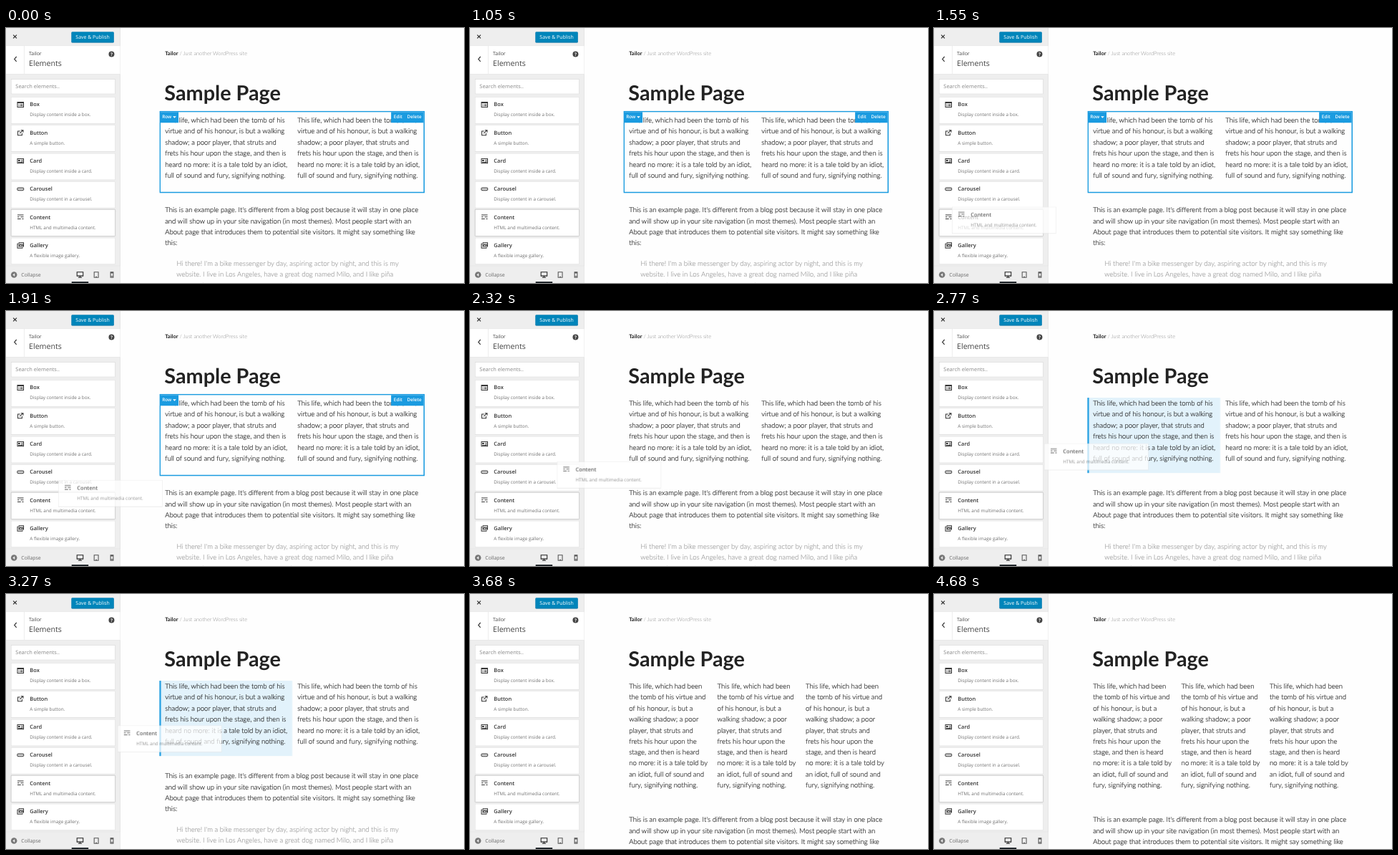
Write an HTML page that moves like this. It is 640 by 356 pixels and loops after 5.28 s.

```html
<!DOCTYPE html>
<html lang="en">
<head>
<meta charset="utf-8">
<title>Page builder</title>
<style>
  html, body { margin: 0; width: 100%; height: 100%; overflow: hidden; background: #fefefe; }
  /* Laid out at 1200px wide, shown at 640px; unrounded glyph advances keep text true to scale */
  #app {
    position: absolute; left: 0; top: 0; width: 1200px; height: 668px; overflow: hidden;
    transform: scale(.533333); transform-origin: 0 0; background: #fefefe;
    font: 13px/1 "Open Sans", sans-serif; color: #444; --loop: 5280ms;
    text-rendering: geometricPrecision;
  }
  #app div, #app svg { position: absolute; white-space: nowrap; box-sizing: border-box; }
  svg { overflow: visible; }

  /* Preview */
  .copy { left: 416.6px; font: 300 18px/28.8px Lato, sans-serif; color: #222; -webkit-text-stroke: .3px; }
  .brand { left: 416.6px; top: 59px; font: 300 14px/1.2 Lato, sans-serif; color: #8c8c8c; }
  .brand b { font-weight: 700; color: #222; }
  .title { left: 415px; top: 137px; font: 700 54px/1.2 Lato, sans-serif; color: #222; }
  .quote { left: 30px; top: 140.5px; color: #a0a0a0; }
  .row { left: 402px; top: 217px; width: 695px; height: 215px; border: 3px solid #1a9be0; }
  .tab { top: 0; height: 28px; background: #1a9be0; color: #fff; font-weight: 600; font-size: 12px; line-height: 26px; }
  .drop { left: 402px; top: 227px; width: 348px; height: 197px; border-left: 4px solid #1a9be0; background: rgba(26, 155, 224, .12); }

  /* Sidebar */
  .side { left: 0; top: 0; width: 300px; height: 668px; background: #eee; border-right: 1px solid #ddd; }
  .head { left: 0; top: 46px; width: 299px; height: 75px; background: #fff; border: solid #ddd; border-width: 1px 0; }
  .back { left: 0; top: 0; width: 48px; height: 73px; border-right: 1px solid #ddd; }
  .save { left: 171px; top: 10px; width: 112px; height: 29px; border-radius: 3px; background: #0085ba;
          border: 1px solid #0073aa; border-bottom: 2px solid #006799; color: #fff; font-weight: 500; line-height: 25px; text-align: center; }
  .find { left: 13px; top: 134px; width: 273px; height: 39px; border: 1px solid #d5d5d5; background: #fff;
          font-size: 14px; line-height: 37px; padding-left: 11px; color: #8a8a8a; }
  .card { left: 13px; width: 273px; height: 70px; background: #fff; border: 1px solid #ddd; border-bottom-color: #d0d0d0; }
  .card.hot { border-color: #bbb; box-shadow: 0 1px 4px rgba(0, 0, 0, .25); }
  .card b { position: absolute; left: 48.5px; top: 12.5px; font-weight: 600; font-size: 14px; color: #333; }
  .card span { position: absolute; left: 48.5px; top: 39.5px; font-size: 12px; color: #707070; }
  .card svg { left: 15px; top: 11px; }
  .foot { left: 0; top: 622px; width: 299px; height: 46px; background: #eee; border-top: 1px solid #ddd; }

  /* Timeline */
  .row, .drop, .two, .three, .ghost { animation: var(--loop) infinite; }
  .row { animation-name: row; animation-timing-function: step-end; }
  .drop { animation-name: drop; animation-timing-function: step-end; }
  .two { animation-name: two; animation-timing-function: step-end; }
  .three { animation-name: three; animation-timing-function: step-end; }
  .flow { top: 461px; animation: flow var(--loop) step-end infinite; }
  .ghost { opacity: 0; animation: drag var(--loop) linear infinite, held var(--loop) step-end infinite; }
  @keyframes row { 0% { opacity: 1 } 38%, 100% { opacity: 0 } }
  @keyframes drop { 0% { opacity: 0 } 51.5% { opacity: 1 } 64.4%, 100% { opacity: 0 } }
  @keyframes two { 0% { opacity: 1 } 64.4%, 100% { opacity: 0 } }
  @keyframes three { 0% { opacity: 0 } 64.4%, 100% { opacity: 1 } }
  @keyframes flow { 0% { top: 461px } 64.4%, 100% { top: 576.2px } }
  @keyframes held { 0% { opacity: 0 } 27% { opacity: .74 } 64.4%, 100% { opacity: 0 } }
  @keyframes drag {
    0%, 27% { transform: translate(0, 0) }
    29.4% { transform: translate(34px, -7px) }
    36.2% { transform: translate(123.8px, -32.5px) }
    40.5% { transform: translate(179px, -53px) }
    43.9% { transform: translate(213.8px, -80.5px) }
    50% { transform: translate(266px, -120px) }
    52.5% { transform: translate(275.6px, -128.4px) }
    57%, 100% { transform: translate(279px, -131px) }
  }
</style>
</head>
<body>
<div id="app">
  <div class="brand"><b>Tailor</b> / Just another WordPress site</div>
  <div class="title">Sample Page</div>
  <div class="drop"></div>
  <div class="two" id="two"></div>
  <div class="three" id="three"></div>
  <div class="copy flow">This is an example page. It's different from a blog post because it will stay in one place<br>
    and will show up in your site navigation (in most themes). Most people start with an<br>
    About page that introduces them to potential site visitors. It might say something like<br>
    this:
    <div class="quote">Hi there! I'm a bike messenger by day, aspiring actor by night, and this is my<br>
      website. I live in Los Angeles, have a great dog named Milo, and I like piña<br>
      coladas. (And gettin' caught in the rain.)</div>
  </div>
  <div class="row">
    <div class="tab" style="left:0;width:47px;padding-left:4px">Row
      <svg style="left:32px;top:11px" width="9" height="5"><path d="M0 0h9L4.5 5z" fill="#fff"/></svg></div>
    <div class="tab" style="right:0;width:85px"><div style="left:7px">Edit</div><div style="left:42px">Delete</div></div>
  </div>

  <div class="side" id="side">
    <svg style="left:19px;top:18px" width="9" height="9"><path d="M0 0l9 9M9 0L0 9" stroke="#333" stroke-width="2.4"/></svg>
    <div class="save">Save &amp; Publish</div>
    <div class="head">
      <div class="back"><svg style="left:21px;top:28px" width="7" height="13"><path d="M6.500 0L1 6.500l5.500 6.500" fill="none" stroke="#333" stroke-width="2.2"/></svg></div>
      <div style="left:60px;top:14px">Tailor</div>
      <div style="left:60px;top:36px;font-size:20px">Elements</div>
      <div style="left:269px;top:14px;width:15px;height:15px;border-radius:50%;background:#444;color:#fff;font-weight:700;font-size:12px;line-height:15px;text-align:center">?</div>
    </div>
    <div class="find">Search elements..</div>
  </div>
  <div class="foot">
    <svg style="left:13px;top:15px" width="16" height="16"><circle cx="8" cy="8" r="8" fill="#777"/><path d="M10 3.500v9L4.500 8z" fill="#eee"/></svg>
    <div style="left:40px;top:16px;color:#666">Collapse</div>
    <div style="left:172px;top:41px;width:44px;height:5px;background:#191e23"></div>
    <svg style="left:185px;top:15px" width="18" height="16" fill="none" stroke="#222" stroke-width="2"><path d="M1 1h16v10H1zM9 11v4M4 15h10"/></svg>
    <svg style="left:230px;top:15px" width="13" height="16" fill="none" stroke="#555" stroke-width="2"><path d="M1 1h11v14H1zM5 13h3"/></svg>
    <svg style="left:273px;top:15px" width="9" height="16" fill="none" stroke="#555" stroke-width="2"><path d="M1 1h7v14H1zM1 3h7M1 12h7"/></svg>
  </div>
  <div id="drag"></div>
</div>
<script>
  const $ = id => document.getElementById(id);

  const elements = [
    ["Box", "Display content inside a box.", "M1 1h16v13H1zM1 3h16M4 7h2M8 7h7M4 10.500h2M8 10.500h7"],
    ["Button", "A simple button.", "M8 4H2v11h11V9M7 10l8-8M10 1.500h6v6"],
    ["Card", "Display content inside a card.", "M1 2h16v12H1zM3 6h5M3 8h5M11 6h4M11 9h4M3 11.500h12"],
    ["Carousel", "Display content in a carousel.", "M4 4h10a3.500 3.500 0 0 1 0 7H4a3.500 3.500 0 0 1 0-7zM4 7.500h2M8 7.500h2M12 7.500h2"],
    ["Content", "HTML and multimedia content.", "M1 2.500h16M1 7.500h5M9 7.500h8M1 12.500h9M13 12.500h4"],
    ["Gallery", "A flexible image gallery.", "M5 1h12v10H5zM3 4H1v11h13v-2M6 9l3-4 3 3 2-2 2 3M13 4h1"]
  ];
  const card = ([name, note, icon], i, type = "") =>
    `<div class="card ${type}" style="top:${180.6 + i * 73.7}px">
      <svg width="18" height="16"><path d="${icon}" fill="none" stroke="#333" stroke-width="1.9"/></svg>
      <b>${name}</b><span>${note}</span></div>`;

  $("side").insertAdjacentHTML("beforeend",
    elements.map((e, i) => card(e, i, i === 4 ? "hot" : "")).join(""));
  $("drag").innerHTML = card(elements[4], 4, "ghost");

  const column = (lines, x) =>
    `<div class="copy" style="left:${x}px;top:226.5px">${lines.join("<br>")}</div>`;
  const wide = ["This life, which had been the tomb of his", "virtue and of his honour, is but a walking",
    "shadow; a poor player, that struts and", "frets his hour upon the stage, and then is",
    "heard no more: it is a tale told by an idiot,", "full of sound and fury, signifying nothing."];
  const slim = ["This life, which had been", "the tomb of his virtue and", "of his honour, is but a",
    "walking shadow; a poor", "player, that struts and", "frets his hour upon the", "stage, and then is heard",
    "no more: it is a tale told by", "an idiot, full of sound and", "fury, signifying nothing."];
  $("two").innerHTML = [0, 1].map(i => column(wide, 416.6 + i * 347)).join("");
  $("three").innerHTML = [0, 1, 2].map(i => column(slim, 416.6 + i * 231.4)).join("");
</script>
</body>
</html>
```
